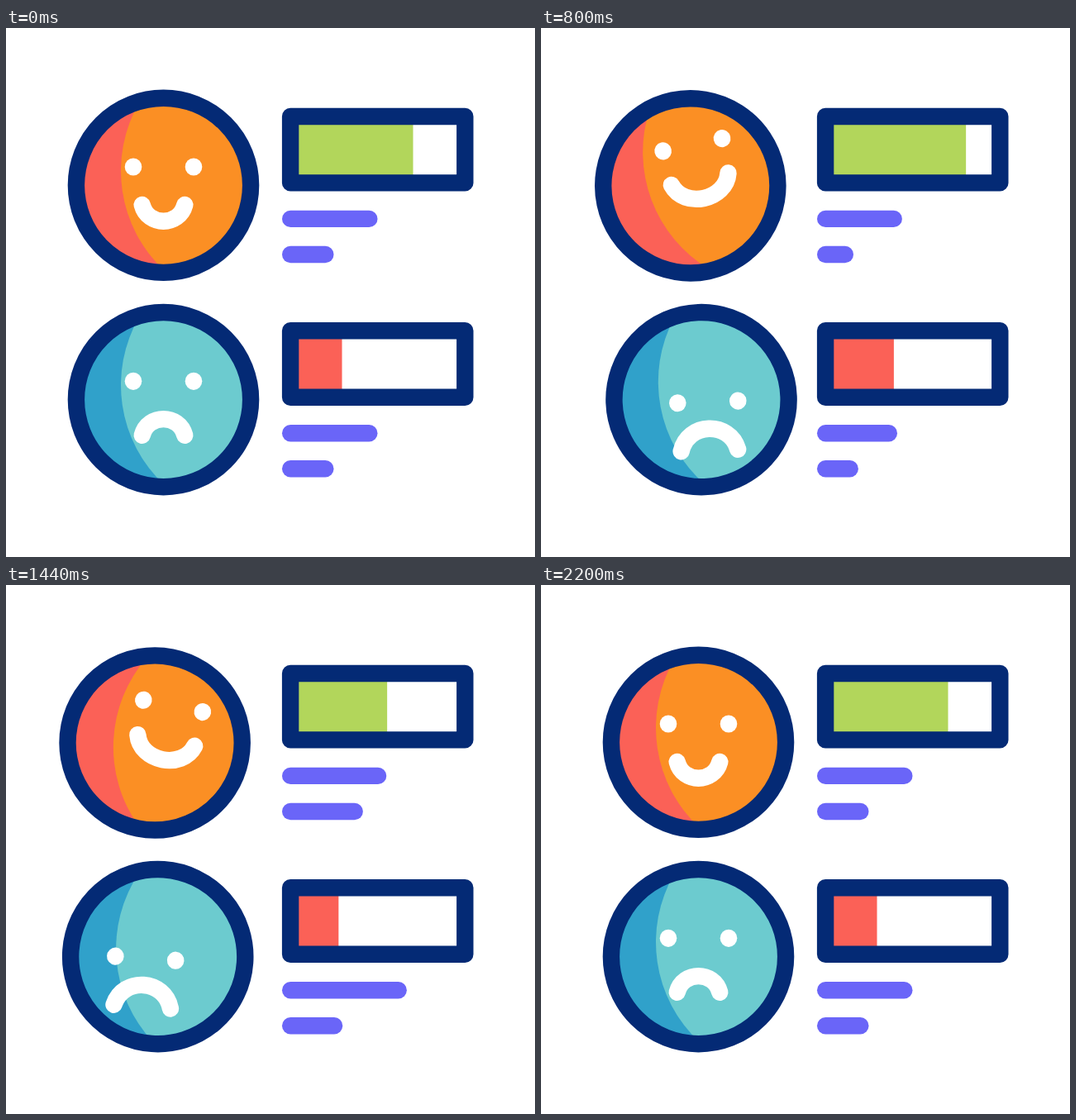
These frames come from a looping animation (640x640 px, 2.4 s). An HTML page:

```html
<!DOCTYPE html>
<html lang="en">
<head>
<meta charset="utf-8">
<title>Satisfaction meter</title>
<style>
  html, body { margin: 0; width: 100%; height: 100%; overflow: hidden; background: #fff; }
  svg { display: block; width: 100%; height: 100%; }
</style>
</head>
<body>
<svg id="stage" viewBox="0 0 640 640"></svg>
<script>
const LOOP = 2400, START = 200, END = 2200, SWAY_START = 600, SWAY_END = 1800;
const NAVY = '#042a75', PURPLE = '#6a65f8', RED = '#fb6157', STROKE = 20.4;
const BAR_X = 354, PILL_X = 344.2, ROW_GAP = 259.3;
const stage = document.getElementById('stage');

function add(parent, tag, attrs) {
  const el = document.createElementNS('http://www.w3.org/2000/svg', tag);
  for (const key in attrs) el.setAttribute(key, attrs[key]);
  return parent.appendChild(el);
}

const outline = { fill: 'none', 'stroke-width': STROKE, 'stroke-linecap': 'round', 'stroke-linejoin': 'round' };
const mix = (a, b, u) => a + (b - a) * u;
const evenTimes = (from, to, parts) =>
  Array.from({ length: parts + 1 }, (_, i) => mix(from, to, i / parts));

// Passes through the values at the given times, easing in and out of each.
function ease(t, times, values) {
  let result = values[0];
  for (let i = 1; i < times.length; i++) {
    const u = Math.min(1, Math.max(0, (t - times[i - 1]) / (times[i] - times[i - 1])));
    result += (values[i] - values[i - 1]) * u * u * (3 - 2 * u);
  }
  return result;
}

const QUARTERS = evenTimes(START, END, 4);
const LATE = [START, 800, 1400, 1800, END];
const ROCK = [0, -1, 1, -1, 0];

const pillChange = (t, times) => 18.5 * ease(t, times, [0, -1, 2, -1, 0]);
const moodUntil = (t, release) => ease(t, [START, SWAY_START, release, END], [0, 1, 1, 0]);

function happyPose(t) {
  const sway = 13 * ease(t, evenTimes(SWAY_START, SWAY_END, 4), ROCK);
  return {
    mood: moodUntil(t, 1750),
    x: sway,
    y: 0.006 * sway * sway,
    turn: 12 * ease(t, [SWAY_START, 800, 1400, SWAY_END, 1940], ROCK),
    look: 0,
    level: 492.5 + ease(t, [START, 850, 1520, END], [0, 22, -33.5, 0]),
    pills: [QUARTERS, LATE].map(times => pillChange(t, times))
  };
}

function sadPose(t) {
  const sway = ease(t, evenTimes(SWAY_START, SWAY_END, 3), [0, 1, -1, 0]);
  return {
    mood: moodUntil(t, SWAY_END),
    x: 7 * sway,
    y: 0,
    turn: -4.1 * sway,
    look: 15.2 * sway,
    level: 406.5 + 26 * ease(t, QUARTERS, [0, 1, -1.04, 0.82, 0]),
    pills: [LATE, QUARTERS].map(times => pillChange(t, times))
  };
}

// A curve of the given depth, opening up (side 1) or down (side -1).
function mouthPath(y, half, depth, side) {
  const inner = half * 0.74, bend = y + side * depth * 4 / 3;
  return `M${-half} ${y}C${-inner} ${bend} ${inner} ${bend} ${half} ${y}`;
}

function makeRow({ y, shade, light, fill, pose, lift, mouthY, mouthLift, wide, deep, side }) {
  const group = add(stage, 'g', { transform: `translate(0 ${y})` });

  const face = add(group, 'g');
  add(face, 'circle', { r: 104, fill: shade });
  add(face, 'path', { d: 'M-29.4-100A165 165 0 0 0 1 103.2A104 104 0 1 0-29.4-100Z', fill: light });
  add(face, 'circle', { ...outline, r: 105.6, stroke: NAVY });
  const features = add(face, 'g');
  const eyes = add(features, 'g', { fill: '#fff' });
  for (const cx of [-36.5, 36.5]) add(eyes, 'ellipse', { cx, cy: -22.3, rx: 10.3, ry: 10.6 });
  const mouth = add(features, 'path', { ...outline, stroke: '#fff' });

  const bar = add(group, 'rect', { x: BAR_X, y: 116, height: 62, fill });
  add(group, 'rect', { ...outline, x: 344.1, y: 107, width: 211.2, height: 80.4, stroke: NAVY });
  const pills = [230.9, 274].map(py =>
    add(group, 'line', { ...outline, x1: PILL_X, y1: py, y2: py, stroke: PURPLE }));

  return t => {
    const p = pose(t);
    const lean = side > 0 ? 12.8 * p.mood : 0;
    face.setAttribute('transform', `translate(${190.5 + p.x} ${190.3 + p.y}) rotate(${p.turn})`);
    features.setAttribute('transform', `translate(${p.look + lean} 0)`);
    eyes.setAttribute('transform', `translate(0 ${lift * p.mood})`);
    mouth.setAttribute('d', mouthPath(
      mouthY + mouthLift * p.mood, mix(25.8, wide, p.mood), mix(19.7, deep, p.mood), side));
    bar.setAttribute('width', p.level - BAR_X);
    pills.forEach((pill, i) => pill.setAttribute('x2', 439.3 - 53 * i + p.pills[i]));
  };
}

const rows = [
  makeRow({
    y: 0, shade: RED, light: '#fb8f24', fill: '#b2d65b', pose: happyPose,
    lift: -25.7, mouthY: 23.7, mouthLift: -29.3, wide: 35.1, deep: 23.7, side: 1
  }),
  makeRow({
    y: ROW_GAP, shade: '#30a1ca', light: '#6ccbcf', fill: RED, pose: sadPose,
    lift: 25.4, mouthY: 43.2, mouthLift: 18.5, wide: 34.3, deep: 26.2, side: -1
  })
];

const start = performance.now();
function tick() {
  const t = (performance.now() - start) % LOOP;
  rows.forEach(update => update(t));
  requestAnimationFrame(tick);
}
tick();
</script>
</body>
</html>
```
